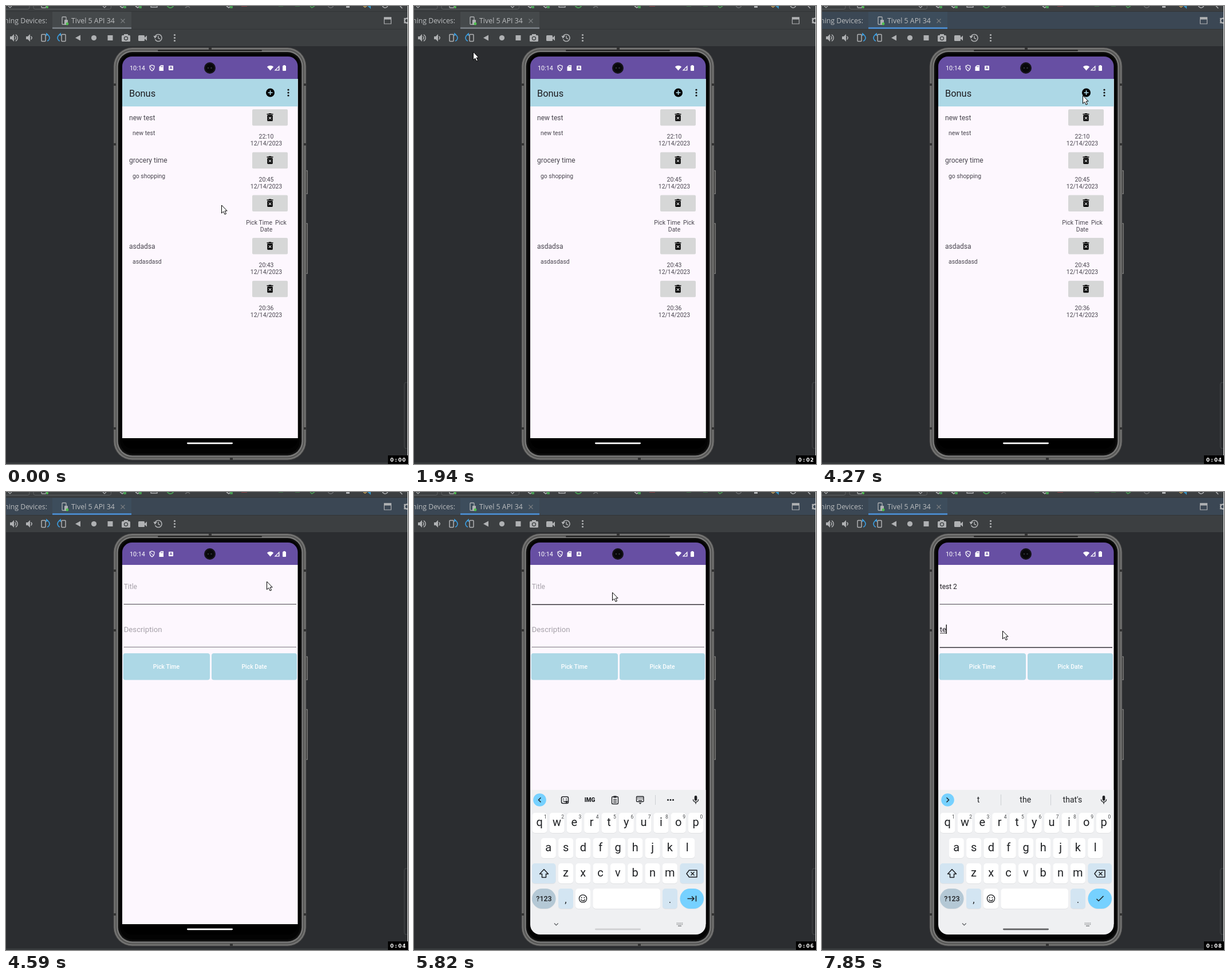
Write an HTML page with a canvas that moves like this. It is 702 by 798 pixels and loops after 8000 ms.

```html
<!DOCTYPE html>
<html lang="en">
<head>
<meta charset="utf-8">
<title>Reminder app demo</title>
<style>
html, body { margin: 0; width: 100%; height: 100%; overflow: hidden; background: #2b2d30; }
canvas { display: block; width: 702px; height: 798px; }
</style>
</head>
<body>
<canvas id="stage" width="702" height="798"></canvas>
<script>
const c = document.getElementById('stage').getContext('2d');
const LOOP = 8000;
const UI = 'Roboto, sans-serif', IDE = '"Open Sans", "Noto Sans", sans-serif';
const GREY = '#afb1b3', INK = '#1f2124', BLUE = '#76d1ff', PAPER = '#fdf7fe', SKY = '#add8e6';

const clamp = v => Math.max(0, Math.min(1, v));
const span = (t, a, b) => clamp((t - a) / (b - a));
const ease = p => p * p * (3 - 2 * p);
const mix = (a, b, p) => a + (b - a) * p;

function box(x, y, w, h, col) { c.fillStyle = col; c.fillRect(x, y, w, h); }
function shape(x, y, w, h, r) { c.beginPath(); c.roundRect(x, y, w, h, r); }
function rr(x, y, w, h, r, col) { shape(x, y, w, h, r); c.fillStyle = col; c.fill(); }
function frame(x, y, w, h, r, col, lw = 1) { shape(x, y, w, h, r); c.strokeStyle = col; c.lineWidth = lw; c.stroke(); }
function dot(x, y, r, col) { c.beginPath(); c.arc(x, y, r, 0, 7); c.fillStyle = col; c.fill(); }
function arc(x, y, r, a, b, col, lw) { c.beginPath(); c.arc(x, y, r, a, b); c.strokeStyle = col; c.lineWidth = lw; c.stroke(); }
function trace(p) {
  c.beginPath();
  for (let i = 0; i < p.length; i += 2) c.lineTo(p[i], p[i + 1]);
}
function poly(col, ...p) { trace(p); c.closePath(); c.fillStyle = col; c.fill(); }
function line(col, lw, ...p) { trace(p); c.strokeStyle = col; c.lineWidth = lw; c.stroke(); }
// y is the middle of the capital letters
function text(s, x, y, size, col, align = 'left', weight = 400, font = UI) {
  c.font = `${weight} ${size}px ${font}`;
  c.textAlign = align;
  c.fillStyle = col;
  c.fillText(s, x, y + size * 0.355);
  return c.measureText(s).width;
}
function at(x, y, draw) { c.save(); c.translate(x, y); draw(); c.restore(); }

function topStrip() {
  box(0, 0, 702, 10, '#3c3f41');
  frame(-10, -15, 51, 20.5, 3, '#5e6163');
  frame(48, -15, 135.5, 20.5, 3, '#5e6163');
  line(GREY, 1.2, 4, 0, 7, 3, 10, 0);
  frame(62, -6, 8, 9, 1, GREY, 1.3);
  dot(72, 2, 2, '#4ec04e');
  line(GREY, 1.2, 169, 0, 172, 3, 175, 0);
  for (const x of [199, 226, 385]) {
    line(GREY, 1.6, x, 0, x + 4, 3, x + 8, 0);
    rr(x + 6, 0, 5, 4, 1, '#499c54');
  }
  line(GREY, 1.3, 253, 0, 253, 2, 264, 2, 264, 0);
  arc(287, -3, 6, 0.3, 2.8, '#499c54', 2);
  line('#6d7072', 1.5, 313, 3, 318, 0, 321, 3);
  box(411, 0, 10, 1, '#8a3f45');
  for (const x of [476, 505]) box(x, 0, 8, 1, '#3f7048');
  line('#499c54', 1.5, 531, 0, 534, 3, 539, 0);
  arc(567, -2, 5, 0.3, 2.8, '#6d7072', 1.3);
  box(594, 0, 6, 3, GREY);
  line('#c9a35b', 1.5, 624, 0, 627, 2, 630, 0);
  poly('#3592c4', 631, 0, 637, 0, 637, 5);
  arc(662, -2, 5, 0.3, 2.8, GREY, 1.5);
  line(GREY, 1.5, 688, 0, 692, 4);
  box(0, 9, 702, 1, '#323537');
}

function rotateIcon(x, dir) {
  at(x, 55.5, () => {
    c.scale(dir, 1);
    frame(-7, -6, 7, 12, 1, GREY, 1.5);
    arc(1, 0, 6, -1.3, 1.2, '#3b9bdc', 1.7);
    poly('#3b9bdc', 1, -9, 1, -3, 5, -6);
  });
}

function speaker(x, waves) {
  poly(GREY, x - 6, 53, x - 3, 53, x + 1, 49, x + 1, 62, x - 3, 58, x - 6, 58);
  for (let i = 0; i < waves; i++) arc(x + 1, 55.5, 3 + i * 3.2, -1.1, 1.1, GREY, 1.5);
}

function ide(focus) {
  box(0, 0, 702, 798, '#2b2d30');
  topStrip();
  box(0, 10, 702, 31, focus ? '#3b4754' : '#3c3f41');
  box(81, 10, 138, 31, focus ? '#3d4d5c' : '#45494b');
  box(81, 37, 138, 3, focus ? '#4a88c7' : '#747a80');
  text('Running Devices:', 72, 26, 12.3, '#bbbdbf', 'right', 400, IDE);
  frame(98, 19, 7, 13, 1, GREY, 1.3);
  rr(102, 24, 6, 9, 1, GREY);
  dot(107, 31, 2.4, '#4ec04e');
  text('Tivel 5 API 34', 114, 26, 12.4, '#bbbdbf', 'left', 400, IDE);
  line('#7b7e80', 1.1, 200.5, 22.5, 207.5, 29.5);
  line('#7b7e80', 1.1, 207.5, 22.5, 200.5, 29.5);
  frame(660.5, 20, 12, 11, 0, GREY, 1.2);
  box(660, 19.5, 13, 4, GREY);
  arc(700, 25.5, 4, 0, 7, GREY, 2.4);
  line(GREY, 2, 695, 21.5, 698, 23);
  line(GREY, 2, 695, 29.5, 698, 28);

  box(0, 40, 702, 1, '#323537');
  box(0, 41, 702, 29, '#3c3f41');
  speaker(13, 2);
  speaker(41, 1);
  rotateIcon(69, 1);
  rotateIcon(97, -1);
  poly(GREY, 121, 55.5, 130, 50.5, 130, 60.5);
  dot(153.5, 55.5, 4.6, GREY);
  box(177.5, 51, 9, 9, GREY);
  rr(202, 51, 15, 11, 1.5, GREY);
  box(206, 49, 7, 3, GREY);
  arc(209.5, 56.3, 3, 0, 7, '#3c3f41', 1.3);
  rr(231, 51, 11, 10, 1.5, GREY);
  poly(GREY, 241, 56, 246, 51.5, 246, 60.5);
  arc(266, 55.5, 6, -2.7, 2.7, GREY, 1.6);
  poly(GREY, 257.5, 52, 264, 52, 260, 57);
  line(GREY, 1.4, 266, 52, 266, 56, 269, 57.5);
  for (const y of [50.5, 55.5, 60.5]) dot(294.5, y, 1.6, GREY);
  frame(695.5, 656, 20, 115, 3, '#45484a');
  box(0, 795, 702, 3, '#36393b');
}

function phone() {
  for (const [y, h] of [[286, 42], [378, 89]]) {
    rr(523, y, 4, h, 1.5, '#7a7a79');
    box(524.5, y + 2, 1, h - 4, '#2c2c2c');
  }
  const rings = ['#434343', '#6f6f6e', '#7c7c7b', '#626261', '#545453', '#5b5b5a', '#7b7b7a', '#828281', '#2a2a2a'];
  rings.forEach((col, i) => rr(187.5 + i, 72 + i, 337 - 2 * i, 719.5 - 2 * i, 33 - i, col));
  rr(196, 80.5, 320, 702, 25, '#0d0d0d');
  rr(199, 83, 314, 697, 22, '#030303');
  rr(265, 76.5, 182, 2, 1, '#151515');
  for (const x of [188, 520]) for (const y of [135, 239, 734]) box(x, y, 4, 4, '#333');
  box(354, 72, 5, 4, '#333');
  box(391, 787, 5, 4, '#333');
}

function statusBar() {
  box(203, 88, 307, 39, '#674fa3');
  text('10:14', 216, 108, 10.8, '#fff');
  c.beginPath();
  c.moveTo(255, 103);
  c.lineTo(259, 104.5);
  c.quadraticCurveTo(259.5, 110.5, 255, 113);
  c.quadraticCurveTo(250.5, 110.5, 251, 104.5);
  c.closePath();
  c.strokeStyle = '#fff'; c.lineWidth = 1.2; c.stroke();
  line('#fff', 1, 252, 105, 258, 111);
  poly('#fff', 267.5, 106, 270.5, 103, 275, 103, 275, 113, 267.5, 113);
  for (const x of [270.5, 272.5]) box(x, 104.3, 1, 2.2, '#674fa3');
  rr(284, 104, 8, 8, 1, '#fff');
  text('A', 288, 108, 7, '#674fa3', 'center', 700);
  c.beginPath();
  c.moveTo(461.5, 112.5);
  c.arc(461.5, 112.5, 8.7, -2.28, -0.86);
  c.fillStyle = '#fff'; c.fill();
  poly('#fff', 468.5, 112.5, 477.5, 112.5, 477.5, 103.5);
  poly('#674fa3', 471.5, 111.3, 476, 111.3, 476, 106.8);
  rr(483, 104, 6, 9, 1, '#fff');
  box(484.5, 103, 3, 2, '#fff');
  dot(356, 108, 10, '#15131a');
  dot(356, 108, 7.5, '#08080a');
  dot(353, 108, 1.3, '#30343a');
  dot(358.5, 108, 1.3, '#30343a');
}

function trash(x, y) {
  rr(x - 4.7, y - 4, 9.4, 10.6, 1.2, '#000');
  box(x - 5.5, y - 6.2, 11, 1.5, '#000');
  box(x - 2.2, y - 7, 4.4, 1.5, '#000');
  line('#d6d7d7', 1.2, x - 2.3, y - 1, x + 2.3, y + 3.6);
  line('#d6d7d7', 1.2, x + 2.3, y - 1, x - 2.3, y + 3.6);
}

const rows = [
  ['new test', 'new test', '22:10', '12/14/2023'],
  ['grocery time', 'go shopping', '20:45', '12/14/2023'],
  ['', '', 'Pick Time\u00a0 Pick', 'Date'],
  ['asdadsa', 'asdasdasd', '20:43', '12/14/2023'],
  ['', '', '20:36', '12/14/2023']
];

function listPage(press) {
  box(203, 127, 307, 626, PAPER);
  box(203, 127, 307, 48, SKY);
  text('Bonus', 215, 152, 16.4, '#1c1b1f');
  if (press > 0) dot(461.5, 151, mix(8, 19, press), 'rgba(0,0,0,.1)');
  dot(461.5, 151, 7.5, '#000');
  box(457.5, 150.2, 8, 1.6, SKY);
  box(460.7, 147, 1.6, 8, SKY);
  for (const y of [146, 151, 156]) dot(493, y, 1.6, '#111');
  rows.forEach(([title, note, a, b], i) => {
    const y = 180 + i * 74.7, col = '#48454e';
    text(title, 215, y + 14.5, 12, col);
    text(note, 221, y + 41.5, 10.4, col);
    rr(430, y, 62, 28.5, 2, '#d6d7d7');
    trash(461, y + 14);
    text(a, 454.5, y + 47.5, 10.4, col, 'center');
    text(b, 454.5, y + 59.7, 10.4, col, 'center');
  });
}

// [time, field, content]; field 0 is the title, 1 the description
const edits = [
  [5200, 0, ''], [5990, 0, 't'], [6260, 0, 'te'], [6500, 0, 'tes'], [6700, 0, 'test'],
  [6920, 0, 'test '], [7080, 0, 'test 2'], [7480, 1, ''], [7730, 1, 't'], [7840, 1, 'te']
];
const hints = {
  't': ['t', 'the', "that's"], 'te': ['te', 'the', 'tea'], 'tes': ['tes', 'test', 'yes'],
  'test': ['test', 'tests', 'testing'], 'test ': ['the', 'is', 'and'], 'test 2': ['2', '2nd', '20']
};

function form(t) {
  const values = ['', ''];
  let active = -1, last = 0;
  for (const [when, field, value] of edits) if (t >= when) {
    values[field] = value; active = field; last = when;
  }
  return { values, active, caret: active >= 0 && (t - last) % 1000 < 500 };
}

function field(i, hint, size, y, lineY, state) {
  const value = state.values[i], on = state.active === i;
  const w = text(value || hint, 205.7, y, size, value ? '#1f1d22' : '#a6a1a9');
  const end = 205.2 + (value ? w : 0);
  if (on && value && !/\d/.test(value)) box(206, y + 6, w, 1, '#333');
  if (on && state.caret) box(end, y - 8.5, 1.5, 16, '#222');
  if (on) box(205.5, lineY + 0.4, 301.5, 1.5, '#38363b');
  else box(205.5, lineY, 301.5, 1, i ? '#76727a' : '#4b494e');
}

function formPage(state) {
  box(203, 127, 307, 626, PAPER);
  field(0, 'Title', 12, 164.5, 195, state);
  field(1, 'Description', 13.2, 239.5, 269.7, state);
  rr(204.5, 281, 151.5, 46.5, 4, SKY);
  rr(359, 281, 149, 46.5, 4, SKY);
  text('Pick Time', 280, 304.5, 10.4, '#fff', 'center', 500);
  text('Pick Date', 433.5, 304.5, 10.4, '#fff', 'center', 500);
}

function key(x, y, w, col = '#fff', r = 5) {
  rr(x, y + 1, w, 35, r, 'rgba(0,0,0,.06)');
  rr(x, y, w, 35, r, col);
}

function letters(s, x, y) {
  [...s].forEach((ch, i) => {
    const m = x + i * 30.3;
    key(m - 13, y, 26);
    text(ch, m, y + 16, 20, INK, 'center');
    if (s.length === 10) text((i + 1) % 10, m + 10, y + 6.5, 8.5, '#44474a', 'center');
  });
}

function mic(x, y) {
  rr(x - 2.3, y - 7.5, 4.6, 9, 2.3, INK);
  arc(x, y - 1, 4.6, 0, Math.PI, INK, 1.4);
  box(x - 0.7, y + 3.5, 1.4, 3.5, INK);
}

function miniKeys(x, y, col) {
  for (let r = 0; r < 2; r++) for (let i = 0; i < 5; i++) box(x - 5.2 + i * 2.3, y - 3 + r * 2.4, 1.2, 1.2, col);
  box(x - 3, y + 2, 6, 1.2, col);
}

function tools() {
  frame(257.5, 531, 12, 11.5, 2.5, INK, 1.5);
  dot(261, 535, 0.9, INK);
  dot(266, 535, 0.9, INK);
  arc(263.5, 536.5, 3, 0.3, 2.8, INK, 1.2);
  poly(INK, 265, 543, 265, 538.5, 270, 538.5);
  text('IMG', 307, 536.8, 10, INK, 'center', 900);
  frame(345.5, 531, 11, 12.5, 1.5, INK, 1.4);
  box(348.5, 529.5, 5, 3.2, INK);
  for (const y of [535, 537.5, 540]) box(348, y, 6, 1.1, INK);
  frame(388.5, 530.5, 12.5, 9, 1, INK, 1.3);
  miniKeys(395, 535, INK);
  poly(INK, 392.5, 541.5, 397.5, 541.5, 395, 544);
  box(421, 528, 1, 17, '#cdd0d3');
  for (const x of [443.5, 448, 452.5]) dot(x, 536.5, 1.5, INK);
}

function keyboard(words, done, bar) {
  box(203, 519, 307, 300, '#eff0f2');
  dot(219.5, 536.5, 11.3, BLUE);
  const d = words ? 2 : -2;
  line(INK, 1.5, 219.5 - d, 532.5, 219.5 + d, 536.5, 219.5 - d, 540.5);
  if (words) {
    words.forEach((w, i) => text(w, 273 + i * 82.2, 536.5, 14, INK, 'center'));
    for (const x of [312, 399]) box(x, 527, 1, 19, '#cdd0d3');
  } else tools();
  mic(492, 536.5);

  letters('qwertyuiop', 219.3, 559);
  letters('asdfghjkl', 234.8, 603);
  letters('zxcvbnm', 265, 647);
  const pale = '#d3e5f2';
  key(206, 647, 41.5, pale);
  c.lineJoin = 'round';
  line(INK, 1.5, 227, 657.5, 219.5, 665.5, 223.5, 665.5, 223.5, 671.5, 230.5, 671.5, 230.5, 665.5, 234.5, 665.5, 227, 657.5, 226, 658.5);
  key(464.5, 647, 41.5, pale);
  line(INK, 1.5, 476, 665, 480.5, 659, 494, 659, 494, 671, 480.5, 671, 476, 665, 477, 664);
  line(INK, 1.4, 483.5, 662, 489.5, 668);
  line(INK, 1.4, 489.5, 662, 483.5, 668);
  key(206, 691, 41.5, '#b4c8d5', 17.5);
  text('?123', 227, 708.5, 12.5, INK, 'center', 500);
  key(252, 691, 26, pale);
  text(',', 265, 710, 17, INK, 'center');
  key(282, 691, 26);
  arc(295, 708.5, 6.6, 0, 7, INK, 1.4);
  dot(292.7, 706.8, 1, INK);
  dot(297.3, 706.8, 1, INK);
  arc(295, 709, 3.4, 0.2, 2.94, INK, 1.4);
  key(312.5, 691, 117.5);
  key(434, 691, 26, pale);
  text('.', 447, 710, 17, INK, 'center');
  key(464.5, 691, 41.5, BLUE, 17.5);
  if (done) line(INK, 1.6, 479.5, 709, 483, 712.5, 491.5, 704);
  else {
    line(INK, 1.6, 477.5, 708.5, 489, 708.5);
    line(INK, 1.6, 485, 704.5, 489, 708.5, 485, 712.5);
    line(INK, 1.6, 492.5, 703.5, 492.5, 713.5);
  }
  line('#55585b', 1.2, 245, 751.5, 248.3, 754.8, 251.6, 751.5);
  miniKeys(464, 753.5, '#6b6e71');
  handle(bar);
}

function handle(col) { rr(316, 760.4, 80, 2.8, 1.4, col); }

function screen(t) {
  c.save();
  shape(203, 88, 306.5, 683, 17);
  c.clip();
  box(203, 88, 307, 683, '#000');
  const state = form(t), open = span(t, 4410, 4590), slide = 30 * (1 - Math.pow(1 - open, 3));
  if (open < 1) {
    box(203, 127, 307, 626, PAPER);
    at(-slide, 0, () => listPage(span(t, 4270, 4420)));
  }
  if (open > 0) {
    c.save();
    c.globalAlpha = clamp(open * 2);
    c.translate(30 - slide, 0);
    formPage(state);
    c.restore();
  }
  statusBar();
  handle('#fff');
  if (t >= 5490) {
    const rise = t < 5520 ? 100 : 40.5 * (1 - ease(span(t, 5545, 5640)));
    // suggestions trail the last letter
    const known = t >= 7840 ? 't' : state.values[Math.max(0, state.active)];
    at(0, rise, () => keyboard(hints[known], state.active === 1, t < 6050 ? '#cfd0d2' : '#606163'));
  }
  c.restore();
}

// [start, end, x, y]: the pointer reaches x, y at the end time
const moves = [
  [150, 220, 374, 346], [1490, 1930, 103, 79], [2120, 2420, 232, 229], [3160, 3250, 407, 264],
  [3400, 3570, 329, 218], [3720, 4090, 455, 155], [4740, 5200, 346, 174], [7150, 7450, 315, 241]
];

function pointer(t) {
  let x = 376, y = 346;
  // circling over the list
  if (t >= 2420 && t < 3160) {
    const a = mix(220, -378, span(t, 2420, 3160)) * Math.PI / 180;
    return [316 + 109 * Math.cos(a), 302 + 113 * Math.sin(a)];
  }
  for (const [a, b, nx, ny] of moves) {
    if (t < a) break;
    if (a === 3160) { x = 411; y = 267; }
    const p = ease(span(t, a, b));
    x = mix(x, nx, p);
    y = mix(y, ny, p);
  }
  return [x, y];
}

function cursor(t) {
  const [x, y] = pointer(t);
  at(Math.round(x) + 0.5, Math.round(y) + 1, () => {
    c.lineJoin = 'miter';
    poly('#fff', 0, 0, 0, 14, 3.2, 11, 5.5, 16, 8, 15, 5.6, 10, 9.7, 10);
    c.strokeStyle = '#000'; c.lineWidth = 1; c.stroke();
  });
}

const ticks = [990, 1930, 2900, 3880, 4850, 5810, 6730, 7650];

function clock(t) {
  box(667, 783, 35, 15, '#000');
  const label = '0:0' + ticks.filter(k => t >= k).length;
  [...label].forEach((ch, i) => text(ch, 674 + i * 7, 791, 8.5, '#fff', 'center', 700, '"DejaVu Sans", sans-serif'));
}

function draw(now) {
  const t = now % LOOP;
  ide(t >= 4270);
  phone();
  screen(t);
  cursor(t);
  box(701, 0, 1, 783, '#e4e4e4');
  clock(t);
  requestAnimationFrame(draw);
}
requestAnimationFrame(draw);
</script>
</body>
</html>
```
